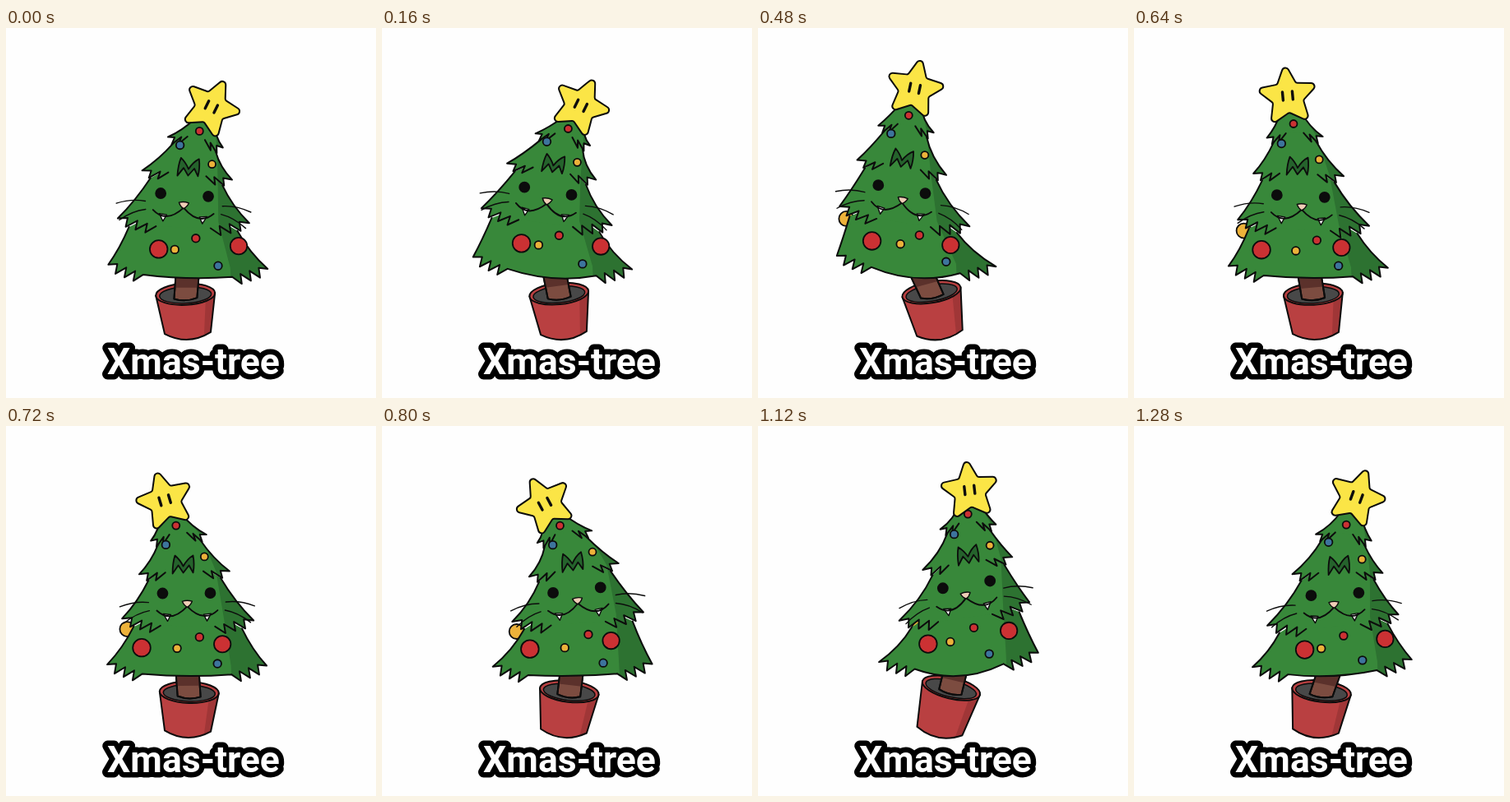
These frames come from a looping animation (450 by 450 pixels, 1.36 s). An HTML page with a canvas:

```html
<!DOCTYPE html>
<html lang="en">
<head>
<meta charset="utf-8">
<title>Xmas-tree</title>
<style>
html, body { margin: 0; width: 100%; height: 100%; overflow: hidden; background: #fefefe; }
canvas, svg { position: absolute; left: 0; top: 0; width: 450px; height: 450px; }
text {
  font: bold 44.5px Roboto, Arial, sans-serif; text-anchor: middle;
  fill: #fff; stroke: #000; stroke-width: 13px; stroke-linejoin: round; paint-order: stroke;
}
</style>
</head>
<body>
<canvas id="tree"></canvas>
<svg viewBox="0 0 450 450"><text x="228" y="421">Xmas-tree</text></svg>
<script>
const INK = '#0c0c0c', GREEN = '#38883a', SHADE = '#2d7231';
const RED = '#cb3133', GOLD = '#ecb23a', BLUE = '#3d749d';
const FACE_UP = 87, TOP_UP = 170;

const ctx = tree.getContext('2d');
const dpr = window.devicePixelRatio || 1;
tree.width = tree.height = 450 * dpr;

const mix = (a, b, t) => [a[0] + (b[0] - a[0]) * t, a[1] + (b[1] - a[1]) * t];
const shift = (p, x, y, r) => [
  p[0] + x * Math.cos(r) - y * Math.sin(r),
  p[1] + x * Math.sin(r) + y * Math.cos(r)
];

// The dance: every moving quantity is a short sum of harmonics of one phase.
function pose(phase) {
  const { cos, sin } = Math;
  const wave = (mean, c1, s1 = 0, c2 = 0, s2 = 0, c3 = 0) =>
    mean + c1 * cos(phase) + s1 * sin(phase)
    + c2 * cos(2 * phase) + s2 * sin(2 * phase) + c3 * cos(3 * phase);
  const turn = wave(.9, 27.4, -12.8, -6.5, 1.8, 1.6) * Math.PI / 180;
  return {
    skirt: {
      x: wave(222.4, -27.4, -14.5, -4, -4.1, -5.6),
      y: wave(286.6, -2.4, 1, -3, -4.1, -2.9),
      tilt: wave(.005, .087, .029, .023, 0, .027)
    },
    face: {
      x: wave(220.6, -38.3, -20.8, -3, -6.4, -3.5),
      y: wave(197.9, .9, 0, -6.6, -3.4, -1.4),
      tilt: wave(-.007, .238, .051, 0, .016, .061)
    },
    top: {
      x: wave(222.6, -15.4, -32.1, -3.5, -3.3, 3.4),
      y: wave(115, 1.2, -1.8, -3.3, -8.3),
      tilt: turn / 2
    },
    star: [wave(223.9, -1.1, -41.7, -4.8, 0, 4.6), wave(86.4, -1.2, -2, 1, -9.8)],
    turn,
    potTilt: wave(.033, -.198, -.085),
    yaw: wave(3, 5.4, -10.8)
  };
}

// Bends the tree: a parabola through the skirt, face and top rows.
function row(m, up) {
  const f = FACE_UP, t = TOP_UP;
  const a = (up - f) * (up - t) / (f * t);
  const b = up * (up - t) / (f * (f - t));
  const c = up * (up - f) / (t * (t - f));
  const blend = key => a * m.skirt[key] + b * m.face[key] + c * m.top[key];
  return { p: [blend('x'), blend('y')], tilt: blend('tilt') };
}

function place(m, x, up) {
  const r = row(m, up);
  return shift(r.p, x, 0, r.tilt);
}

function poly(points) {
  const p = new Path2D();
  points.forEach(q => p.lineTo(...q));
  p.closePath();
  return p;
}

function paint(path, fill, width = 2) {
  if (fill) { ctx.fillStyle = fill; ctx.fill(path); }
  if (width) { ctx.lineWidth = width; ctx.stroke(path); }
}

function ball(p, r, color) {
  const c = new Path2D();
  c.arc(p[0], p[1], r, 0, 7);
  paint(c, color, 1.8);
}

function clipped(path, area, color) {
  ctx.save();
  ctx.clip(path);
  paint(area, color, 0);
  ctx.restore();
}

function local(p, angle, draw) {
  ctx.save();
  ctx.translate(...p);
  ctx.rotate(angle);
  draw();
  ctx.restore();
}

function drawPot(m) {
  const a = m.potTilt, c = [221 + 60 * a, 324 - 100 * a * a], base = [221, 371];
  const l = shift(c, -36, 0, a), r = shift(c, 36, 0, a);
  const body = new Path2D();
  body.moveTo(...l);
  body.lineTo(...shift(base, -28, 0, a * .8));
  body.quadraticCurveTo(...shift(base, 0, 16, a * .8), ...shift(base, 28, 0, a * .8));
  body.lineTo(...r);
  body.closePath();
  paint(body, '#b94041', 0);
  clipped(body, poly([shift(c, 25, 0, a), shift(base, 19, 12, a), [300, 400], [300, 300]]), '#a03637');
  paint(body);
  const oval = (rx, ry, y) => {
    const p = new Path2D();
    p.ellipse(...shift(c, 0, y, a), rx, ry, a, 0, 7);
    return p;
  };
  paint(oval(36, 13, 0), '#b94041');
  paint(oval(31.5, 10, 1), '#484848', 1.5);

  const mid = [m.skirt.x, m.skirt.y], foot = shift(c, 0, 5, a);
  const lean = Math.atan2(mid[0] - c[0], c[1] - mid[1]);
  const tl = shift(mid, -14, 0, lean), tr = shift(mid, 14, 0, lean);
  const fl = shift(foot, -14, 0, a), fr = shift(foot, 14, 0, a);
  const trunk = new Path2D();
  trunk.moveTo(...tl);
  trunk.lineTo(...fl);
  trunk.quadraticCurveTo(...shift(foot, 0, 5, a), ...fr);
  trunk.lineTo(...tr);
  paint(trunk, '#7c4c40');
  clipped(trunk, poly([tl, tr, mix(tr, fr, .66), mix(tl, fl, .66)]), '#5b312b');
  paint(trunk);
}

// Zigzag of fur running inward from a branch tip.
function fur(tip, side, angle, { teeth, wide, deep, drop }) {
  const points = [];
  for (let k = 0; k < teeth; k++) {
    const x = wide * (k + 1), y = drop * k;
    points.push(shift(tip, side * x, y - 1, angle));
    points.push(shift(tip, side * (x - 2), y + deep, angle));
  }
  points.push(shift(tip, side * wide * (teeth + .9), drop * teeth - 1, angle));
  return points;
}

const tiers = [
  { up: 155, half: 34, teeth: 2, wide: 8, deep: 8, drop: -2 },
  { up: 112, half: 55, teeth: 2, wide: 11, deep: 8, drop: 0 },
  { up: 55, half: 80, teeth: 3, wide: 12, deep: 10, drop: 3 },
  { up: 0, half: 97, teeth: 3, wide: 11, deep: 11, drop: 4 }
];

function drawTiers(m) {
  const apex = mix([m.top.x, m.top.y], m.star, .45), bow = m.face.tilt * 18;
  const tips = tiers.map(({ up, half }) => [place(m, -half, up), place(m, half, up)]);
  const cut = [.8, .7, .55, .55].map((f, i) =>
    place(m, tiers[i].half * (f - m.face.tilt * .3), tiers[i].up));
  const dark = poly([shift(apex, 12, 0, m.top.tilt), ...cut, [cut[3][0] + 2, 330], [450, 450], [450, 0]]);

  for (let i = tiers.length - 1; i >= 0; i--) {
    const { up } = tiers[i], a = row(m, up).tilt, skirt = i === 3;
    const shape = new Path2D(), line = new Path2D();
    // One flank: root under the tier above, edge, tip and fur.
    const [left, right] = [1, -1].map((side, n) => {
      const tip = tips[i][n];
      const root = i
        ? shift(tips[i - 1][n], side * (5 + 3 * i), 4 + 2 * i, row(m, tiers[i - 1].up).tilt)
        : shift(apex, -side * 12, 0, a);
      const bend = 3 - side * bow;
      return { root, tip, mid: shift(mix(root, tip, .5), side * bend, 3, a), fur: fur(tip, side, a, tiers[i]) };
    });
    const trace = (p, f) => {
      p.moveTo(...f.root);
      p.quadraticCurveTo(...f.mid, ...f.tip);
      f.fur.forEach(q => p.lineTo(...q));
    };
    const end = right.fur[right.fur.length - 1];
    const hem = mix(left.fur[left.fur.length - 1], end, .5);
    hem[1] = 2 * 304 - hem[1];
    for (const p of [shape, line]) {
      trace(p, left);
      if (skirt) p.quadraticCurveTo(...hem, ...end);
    }
    trace(line, right);
    [...right.fur].reverse().forEach(q => shape.lineTo(...q));
    shape.lineTo(...right.tip);
    shape.quadraticCurveTo(...right.mid, ...right.root);
    shape.lineTo(...(i ? place(m, 0, tiers[i - 1].up + 25) : apex));
    shape.closePath();
    paint(shape, GREEN, 0);
    clipped(shape, dark, SHADE);
    paint(line);
  }
}

function drawBalls(m) {
  ball(place(m, -47 + m.yaw, 20), 10.8, RED);
  ball(place(m, 51 + m.yaw, 26), 10.2, RED);
  ball(place(m, -13, 20), 4.8, GOLD);
  ball(place(m, 14, 34), 4.8, RED);
  ball(place(m, 37, 2), 4.8, BLUE);
  ball(place(m, -17, 148), 4.8, BLUE);
  ball(place(m, 27, 130), 4.5, GOLD);
  ball(place(m, 0, TOP_UP), 4.5, RED);
}

function drawFace(m) {
  const a = m.face.tilt;
  local(place(m, 0, 122), a, () => paint(
    new Path2D('M-13 11Q-13 -2 -10 -11Q-4 -6 0 2Q5 -7 12 -11Q14 0 12 10L7 1L0 10L-6 1Z'),
    '#25632c', 1.8));
  [-29, 29].forEach(x => ball(place(m, x, FACE_UP), 6, INK));
  local(place(m, 0, 74), a, () => {
    for (const s of [-1, 1]) {
      paint(poly([[s * 20, 13], [s * 24, 21], [s * 29, 12]]), '#fff', 1.4);
      paint(new Path2D(`M0 3Q${s * 20} 24 ${s * 37} 8`), null, 1.9);
      paint(new Path2D(`M${s * 47} -2Q${s * 64} -4 ${s * 82} 3`), null, 1.4);
      paint(new Path2D(`M${s * 46} 8Q${s * 62} 11 ${s * 77} 23`), null, 1.4);
    }
    paint(new Path2D('M-6 -3Q0 -5 6 -3Q4 2 0 4Q-4 2 -6 -3Z'), '#efcdb6', 1.4);
  });
}

function drawStar(m) {
  const v = [];
  for (let i = 0; i < 10; i++) v.push(shift([0, 0], 0, i % 2 ? -19.5 : -41, i * Math.PI / 5));
  const p = new Path2D();
  p.moveTo(...mix(v[9], v[0], .5));
  v.forEach((q, i) => p.arcTo(...q, ...v[(i + 1) % 10], i % 2 ? 3 : 4.2));
  p.closePath();
  local(m.star, m.turn, () => {
    paint(p, '#fbe546', 2);
    paint(new Path2D('M-6 -6V4M6 -6V4'), null, 3.4);
  });
}

function draw(step) {
  const m = pose((step - 4) * Math.PI / (step < 4 ? 12 : 8));
  ctx.setTransform(dpr, 0, 0, dpr, 0, 0);
  ctx.clearRect(0, 0, 450, 450);
  ctx.strokeStyle = INK;
  ctx.lineJoin = ctx.lineCap = 'round';
  drawPot(m);
  ball(place(m, -74 + 3 * Math.max(0, m.yaw), 42), 9, GOLD);
  drawTiers(m);
  drawBalls(m);
  drawFace(m);
  drawStar(m);
}

let shown;
function tick() {
  // 80 ms drawings; the first is held for two.
  const step = Math.max(1, Math.floor(performance.now() % 1360 / 80));
  if (step !== shown) draw(shown = step);
  requestAnimationFrame(tick);
}
tick();
</script>
</body>
</html>
```
